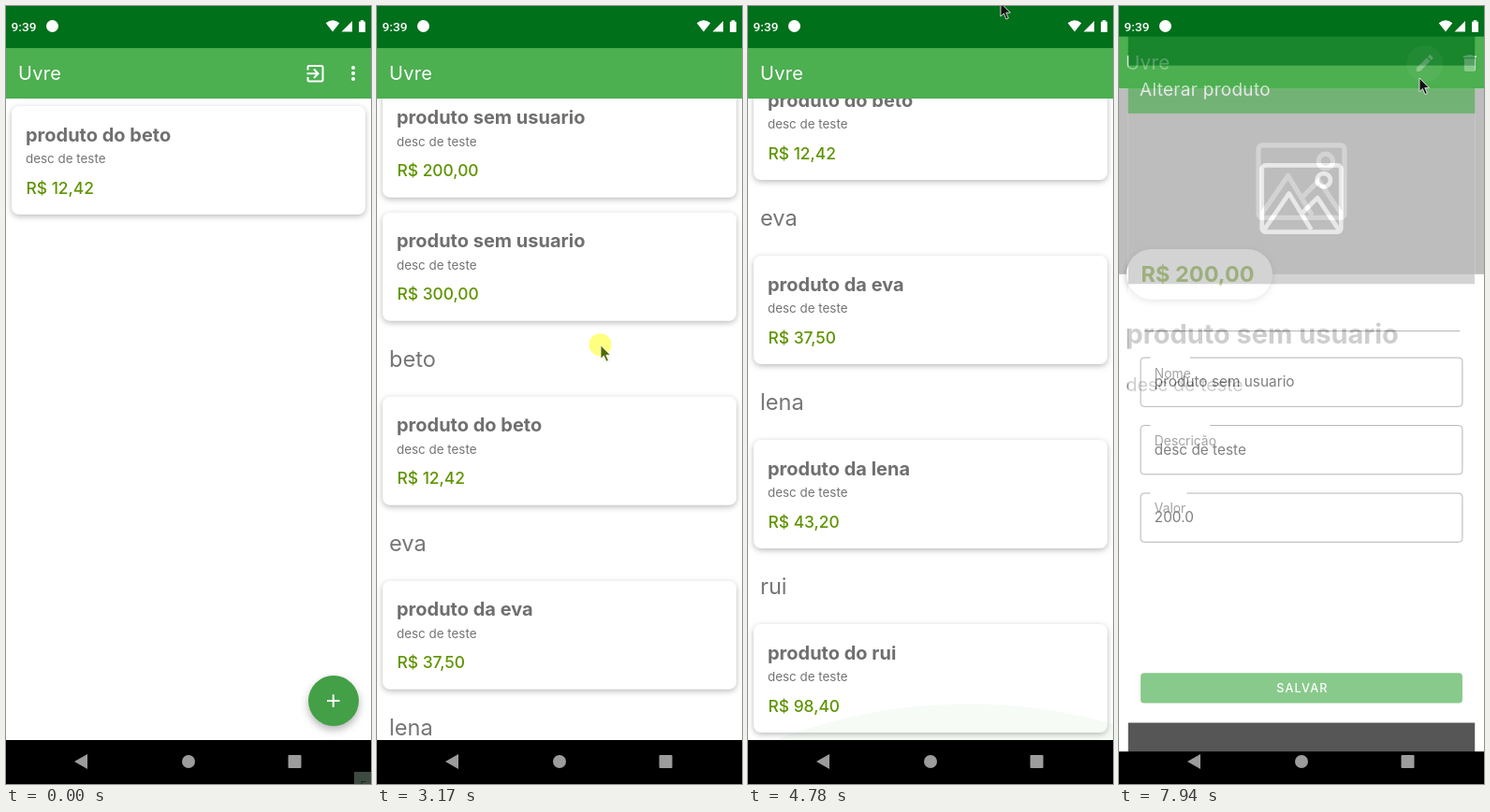
Write an HTML page that moves like this. It is 390 by 832 pixels and loops after 8000 ms.

```html
<!DOCTYPE html>
<html lang="pt-BR">
<head>
<meta charset="utf-8">
<title>Lista de produtos</title>
<style>
  html, body { margin: 0; width: 100%; height: 100%; overflow: hidden; background: #fff; }
  svg { display: block; width: 390px; height: 832px; font-family: Inter, "Open Sans", sans-serif; }
  .bar { fill: #fff; font-size: 20px; letter-spacing: .3px; }
  .name { fill: #6f6f6f; font-weight: 700; font-size: 20px; }
  .desc { fill: #757575; font-size: 13.4px; }
  .price { fill: #5f9400; font-weight: 500; font-size: 17.4px; }
  .head { fill: #757575; font-size: 23.6px; }
  .card { fill: #fff; filter: drop-shadow(0 2px 3px rgba(0,0,0,.27)); }
  .line { fill: none; stroke: #fff; stroke-width: 2; }
</style>
</head>
<body>
<svg id="stage" viewBox="0 0 390 832"></svg>
<script>
const LOOP = 8000, TOP = 99, BOTTOM = 785;
const OPEN = { list: 2140, detail: 6400, form: 7858 };

const text = (cls, x, y, s, more = '') => `<text class="${cls}" x="${x}" y="${y}" ${more}>${s}</text>`;
const rect = (x, y, w, h, fill, more = '') =>
  `<rect x="${x}" y="${y}" width="${w}" height="${h}" fill="${fill}" ${more}/>`;

const card = (y, name, price) =>
  `<rect class="card" x="6" y="${y}" width="378" height="116" rx="8"/>` +
  text('name', 21, y + 37.5, name) + text('desc', 21, y + 61, 'desc de teste') +
  text('price', 21.5, y + 93.5, 'R$ ' + price);

// A full app window: status bar, toolbar, content, navigation bar
const win = (id, title, body, icons = '') => `<g id="${id}">
  ${rect(0, TOP, 390, 690, '#fff')}
  <g clip-path="url(#view)">${body}</g>
  ${rect(0, 44, 390, 55, '#4caf50')}${rect(0, 0, 390, 45, '#00701a')}
  ${text('bar', 13, 79, title)}${icons}
  ${rect(0, BOTTOM, 390, 47, '#000')}</g>`;

const photo = rect(0, TOP, 390, 192, '#bdbdbd') + `
  <g fill="none" stroke="#fff" stroke-width="5" stroke-linejoin="round">
    <rect x="150.500" y="157.500" width="89" height="75" rx="4"/>
    <circle cx="220" cy="174" r="7.500"/>
    <path d="M153 230L181 189 206 230M195 212L213 194 237 230"/></g>`;

const sections = [
  ['Sem usuário', ['produto sem usuario', '200,00'], ['produto sem usuario', '300,00']],
  ['beto', ['produto do beto', '12,42']],
  ['eva', ['produto da eva', '37,50']],
  ['lena', ['produto da lena', '43,20']],
  ['rui', ['produto do rui', '98,40']]
];

function listBody() {
  let y = TOP, out = '';
  for (const [head, ...items] of sections) {
    out += text('head', 13, y + 41, head);
    y += 65;
    for (const [name, price] of items) {
      out += card(y + 8, name, price);
      y += 132;
    }
  }
  return out;
}

const field = (i, label, value, gap) => {
  const y = 374 + i * 76.3;
  return `<path d="M${gap} ${y}H372q4 0 4 4v47q0 4-4 4H18q-4 0-4-4V${y + 4}q0-4 4-4H25" fill="none" stroke="#8a8a8a"/>` +
    text('label', 29.5, y + 32, label, 'fill="#757575"') +
    text('', 29.5, y + 33, value, 'fill="#404040" font-size="16.2"');
};

const mainIcons = `<path class="line" d="M322.500 68.500V65.500q0-1.500 1.500-1.500H337q1.500 0 1.500 1.500V79q0 1.500-1.500 1.500H324q-1.500 0-1.500-1.500V76M321.500 72.300H333M329 67.500L333.500 72.300 329 77"/>
  <g fill="#fff"><circle cx="371" cy="66" r="2"/><circle cx="371" cy="72" r="2"/><circle cx="371" cy="78" r="2"/></g>`;
const fab = `<circle cx="350" cy="743" r="27" fill="#43a047" style="filter:drop-shadow(0 4px 4px rgba(0,0,0,.3))"/>
  <path class="line" d="M343 743H356.500M349.750 736.300V749.700"/>`;
const detailIcons = `<circle id="ripple" cx="322.500" cy="73" r="19" fill="#fff"/>
  <g fill="#fff"><path transform="translate(311 61) scale(.96)" d="M3 17.300V21H6.700L17.800 9.900 14.100 6.200ZM20.700 7q.7-.7 0-1.400L18.400 3.300q-.7-.7-1.400 0L15.100 5.100 18.900 8.900Z"/>
  <path transform="translate(357.500 61) scale(.96)" d="M6 19q0 2 2 2H16q2 0 2-2V7H6ZM19 4H15.500L14.500 3H9.500L8.500 4H5V6H19Z"/></g>`;

const detailBody = photo +
  `<rect class="card" x="14" y="265" width="151" height="52" rx="26"/>` +
  text('price', 29, 299, 'R$ 200,00', 'style="font-size:22.8px;font-weight:700"') +
  text('name', 13.5, 363, 'produto sem usuario', 'style="font-size:28px"') +
  text('desc', 13.5, 412.5, 'desc de teste', 'style="font-size:19px"');

const formBody = photo + rect(18, 343.5, 355, 1, '#8a8a8a') +
  field(0, 'Nome', 'produto sem usuario', 69.5) +
  field(1, 'Descrição', 'desc de teste', 92) +
  field(2, 'Valor', '200.0', 66) +
  rect(14, 729, 362, 34, '#4caf50', 'rx="4"') +
  text('', 196, 750.5, 'SALVAR', 'fill="#fff" font-size="13.3" font-weight="500" letter-spacing="1.2" text-anchor="middle"');

const stage = document.getElementById('stage');
stage.innerHTML = `
  <clipPath id="view"><rect y="${TOP}" width="390" height="${BOTTOM - TOP}"/></clipPath>
  ${win('main', 'Uvre', card(107, 'produto do beto', '12,42') + fab, mainIcons)}
  <g id="menu">
    <rect x="200" y="49" width="188" height="62" rx="3" fill="#fff" style="filter:drop-shadow(0 2px 3px rgba(0,0,0,.25))"/>
    ${rect(200, 57, 188, 46, '#e0e0e0', 'id="pick"')}
    ${text('', 216, 85.5, 'Todos os produtos', 'fill="#222" font-size="15.6"')}
  </g>
  ${win('list', 'Uvre', `<g id="rows">${listBody()}</g>
    <circle id="glowTop" cx="195" r="560" fill="#4caf50"/>
    <circle id="glowEnd" cx="235" r="560" fill="#4caf50"/>`)}
  ${win('detail', 'Uvre', detailBody, detailIcons)}
  ${win('form', 'Alterar produto', formBody)}
  <g fill="#fff">
    <text x="5.500" y="27" font-family="Roboto, sans-serif" font-size="13.700" font-weight="500">9:39</text>
    <circle cx="49.500" cy="21.500" r="6.500"/>
    <path d="M349 27.500L341.700 18.300Q349 12.300 356.300 18.300ZM358.500 27.500H370V16ZM378.700 16.700V15.300H382.300V16.700H384V28H377V16.700Z"/>
  </g>
  <g fill="#9c9c9c"><path d="M73 808L87 800V816Z"/><circle cx="195" cy="808" r="7"/>
    ${rect(301.5, 801, 14, 14, '#9c9c9c', 'rx="1"')}</g>
  <g id="corner">${rect(372, 819, 18, 13, '#3d4a40')}<path d="M384 829.500h-4v3" fill="none" stroke="#1c241e"/></g>
  <g id="cursor">
    <circle id="press" r="12" cx="-.5" cy="-.5" fill="#ff0" fill-opacity=".5"/>
    <path id="arrow" d="M0 0V14.500L3.400 11.400 6 17.500 8.400 16.400 5.800 10.600H10.400Z" stroke="#fff" stroke-width=".8"/>
  </g>`;

const $ = id => document.getElementById(id);
const show = (id, on) => $(id).style.display = on ? '' : 'none';
const set = (id, attrs) => { for (const k in attrs) $(id).setAttribute(k, attrs[k]); };
const clamp = v => Math.max(0, Math.min(1, v));

// Value at time t from rows [time, v1, v2, ...]
function at(keys, t, col = 1) {
  let i = 1;
  while (i < keys.length - 1 && t > keys[i][0]) i++;
  const a = keys[i - 1], b = keys[i];
  return a[col] + (b[col] - a[col]) * clamp((t - a[0]) / (b[0] - a[0]));
}

const cubic = (u, [a, b, c, d]) => {
  const v = 1 - u;
  return v * v * v * a + 3 * v * v * u * b + 3 * v * u * u * c + u * u * u * d;
};
function segment(x, xs, ys) {
  let lo = 0, hi = 1;
  for (let i = 0; i < 24; i++) {
    const mid = (lo + hi) / 2;
    if (cubic(mid, xs) < x) lo = mid; else hi = mid;
  }
  return cubic(lo, ys);
}
// Fast out, extra slow in
const ease = x => x < 1 / 6
  ? segment(x, [0, .05, .1333, .1667], [0, 0, .06, .4])
  : segment(x, [.1667, .2083, .25, 1], [.4, .82, 1, 1]);

const pointer = [
  [270, 388, 809], [420, 384, 690], [700, 375, 330], [920, 369, 110], [1060, 367, 70],
  [1250, 367, 70], [1520, 363, 86], [2200, 363, 86], [2450, 320, 220], [2680, 246, 420],
  [2780, 236, 446], [2850, 236, 446], [3170, 239, 363], [3900, 254, 165], [4440, 268, 42],
  [4640, 270, -4], [4780, 270, -4], [5010, 250, 130], [5490, 206, 561], [5550, 204, 578],
  [5640, 204, 578], [5800, 188, 380], [5980, 175, 226], [7070, 175, 226], [7300, 258, 140],
  [7480, 321, 71], [7700, 321, 71], [7860, 321, 77]
];
const scroll = [
  [2850, 0], [3170, 83], [3900, 281], [4440, 404], [4640, 431], [5010, 431], [5490, 0]
];
const glowTop = [[5470, 0, 0], [5570, .15, 40], [5640, .15, 50], [5710, .14, 50], [5980, 0, 20]];
const glowEnd = [[4440, 0, 0], [4640, .06, 39], [4780, .05, 39], [4920, 0, 20]];
const presses = [[1130, 1230], [1660, 1790], [2790, 4640], [5000, 5550], [6180, 6250], [7500, 7680]];

function placeWindow(id, t, start, next) {
  const on = t >= start && t < next + 400;
  show(id, on);
  if (!on) return;
  const grow = start ? ease(clamp((t - start) / 400)) : 1;
  const leave = ease(clamp((t - next) / 400));
  const s = (.85 + .15 * grow) * (1 + .05 * leave);
  set(id, {
    transform: `translate(195 416) scale(${s}) translate(-195 -416)`,
    opacity: start ? clamp((t - start - 50) / 50) : 1
  });
}

function draw(t) {
  placeWindow('main', t, 0, OPEN.list);
  placeWindow('list', t, OPEN.list, OPEN.detail);
  placeWindow('detail', t, OPEN.detail, OPEN.form);
  placeWindow('form', t, OPEN.form, 1e6);

  const m = at([[1230, 0], [1480, 1]], t);
  show('menu', t > 1230 && t < 2250);
  const ms = .5 + .5 * Math.sqrt(m);
  set('menu', {
    transform: `translate(388 49) scale(${ms}) translate(-388 -49)`,
    opacity: clamp(m * 1.6) * (1 - clamp((t - 2140) / 100))
  });
  set('pick', { opacity: clamp((t - 1970) / 80) });

  set('rows', { transform: `translate(0 ${-at(scroll, t)})` });
  set('glowTop', { cy: TOP + at(glowTop, t, 2) - 560, opacity: at(glowTop, t) });
  set('glowEnd', { cy: BOTTOM - at(glowEnd, t, 2) + 560, opacity: at(glowEnd, t) });
  set('ripple', { opacity: .14 * clamp((t - 7680) / 120) });

  const rise = clamp((t - OPEN.form - 55) / 80);
  for (const el of document.querySelectorAll('.label')) {
    el.setAttribute('dy', -27 * rise);
    el.setAttribute('font-size', 16 - 4 * rise);
  }

  const down = presses.some(([a, b]) => t >= a && t < b);
  const drag = down && t > 2780 && t < 5600;
  show('corner', t < 70);
  show('cursor', t >= 270);
  show('press', down);
  set('cursor', { transform: `translate(${at(pointer, t)} ${at(pointer, t, 2)})` });
  set('arrow', { fill: drag ? '#4f6a00' : '#111' });
}

const begin = performance.now();
function tick() {
  draw((performance.now() - begin) % LOOP);
  requestAnimationFrame(tick);
}
tick();
</script>
</body>
</html>
```
